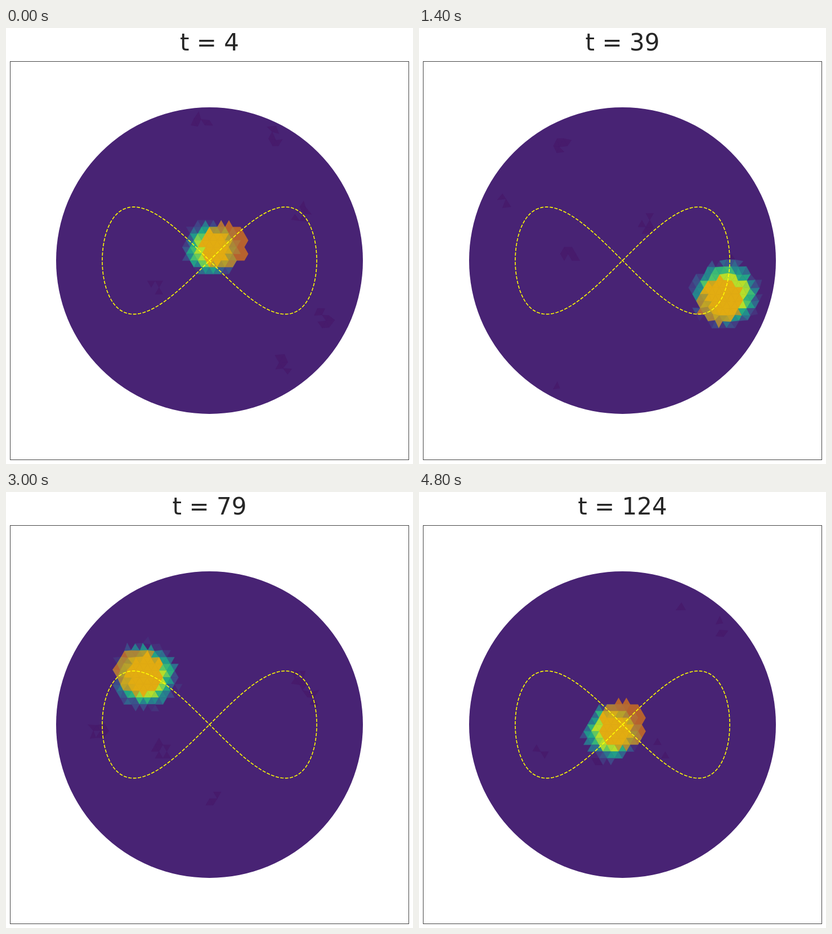
Animation, 723 px wide and 775 px high, one loop 5 s. Source, as an HTML page with a canvas:

```html
<!DOCTYPE html>
<html lang="en">
<head>
<meta charset="utf-8">
<title>Moving inclusion</title>
<style>
html, body { margin: 0; width: 100%; height: 100%; overflow: hidden; background: #fff; }
canvas { position: absolute; left: 0; top: 0; }
#title {
  position: absolute; left: 0; top: 1px; width: 723px; text-align: center;
  font: 42px/50px "DejaVu Sans", sans-serif; color: #262626; white-space: pre;
}
</style>
</head>
<body>
<canvas id="stage" width="723" height="775"></canvas>
<div id="title"></div>
<script>
const ctx = document.getElementById('stage').getContext('2d');
const title = document.getElementById('title');
const CX = 361.5, CY = 413.4, DISC = 272.5, AMP = 190.5;
const SIDE = 13.8, ROW = 11.97, FRAMES = 25;
const TRUE_R = 40.6;

const clamp = v => Math.max(0, Math.min(1, v));
const rand = (a, b) => {
  const s = Math.sin(a * 12.9898 + b * 78.233) * 43758.5453;
  return s - Math.floor(s);
};
const curve = a => [CX + AMP * Math.sin(a), CY - AMP / 2 * Math.sin(2 * a)];

// Viridis colour map
const STOPS = [[68, 1, 84], [72, 36, 117], [65, 68, 135], [53, 95, 141], [42, 120, 142],
  [33, 145, 140], [34, 168, 132], [68, 191, 112], [122, 209, 81], [189, 223, 38], [253, 231, 37]];
function viridis(v) {
  const i = Math.min(9, Math.floor(v * 10)), f = v * 10 - i;
  return `rgb(${STOPS[i].map((c, n) => Math.round(c + (STOPS[i + 1][n] - c) * f))})`;
}

// Triangular mesh, slightly irregular away from the middle
function vertex(k, n) {
  const x = CX + (n + (k % 2 ? 0 : 0.5)) * SIDE, y = CY + k * ROW;
  const j = 4 * clamp((Math.hypot(x - CX, y - CY) - 130) / 60);
  return [x + j * (rand(k, n) - 0.5), y + j * (rand(n, k + 50) - 0.5)];
}
const mesh = [];
function addTriangle(...pts) {
  const x = (pts[0][0] + pts[1][0] + pts[2][0]) / 3;
  const y = (pts[0][1] + pts[1][1] + pts[2][1]) / 3;
  if (Math.hypot(x - CX, y - CY) < DISC + 5) mesh.push({ pts, x, y });
}
for (let k = -24; k < 24; k++) {
  const o = k % 2 ? 0 : 1;
  for (let n = -22; n < 22; n++) {
    addTriangle(vertex(k, n), vertex(k, n + 1), vertex(k + 1, n + o));
    addTriangle(vertex(k, n + 1), vertex(k + 1, n + 1 + o), vertex(k + 1, n + o));
  }
}

// Constant speed along the figure eight: angle for each frame
const angles = [];
{
  const step = 0.0005, total = 6.0972;
  let a = 0, s = 0;
  for (let i = 0; i < FRAMES; i++) {
    const goal = (4 + 5 * i) / 124 * total;
    while (s < goal) {
      s += step * Math.hypot(Math.cos(a), Math.cos(2 * a));
      a += step;
    }
    angles.push(a);
  }
}

// Estimated blob relative to the inclusion: frame, dx, dy, radius
const BLOB = [[0, -23, 5, 46], [5, 0, -30, 55], [9, 22, 7, 58], [11, 5, -33, 39],
  [15, 12, 8, 55], [19, -7, -25, 56], [24, -19, 13, 48]];
function blobAt(i) {
  const n = Math.min(BLOB.length - 2, BLOB.filter(b => b[0] <= i).length - 1);
  const a = BLOB[n], b = BLOB[n + 1], f = (i - a[0]) / (b[0] - a[0]);
  return a.map((v, j) => v + (b[j] - v) * f).slice(1);
}

function trace(t) {
  t.pts.forEach((p, n) => n ? ctx.lineTo(...p) : ctx.moveTo(...p));
  ctx.closePath();
}
function paint(t, color) {
  ctx.beginPath();
  trace(t);
  ctx.fillStyle = ctx.strokeStyle = color;
  ctx.lineWidth = 0.5;
  ctx.fill();
  ctx.stroke();
}

function drawFrame(i) {
  title.textContent = 't = ' + (4 + 5 * i);
  ctx.fillStyle = '#fff';
  ctx.fillRect(0, 0, 723, 775);
  ctx.strokeStyle = '#444';
  ctx.lineWidth = 1;
  ctx.strokeRect(7.5, 59.5, 708, 708);

  ctx.save();
  ctx.beginPath();
  ctx.arc(CX, CY, DISC, 0, 7);
  ctx.fillStyle = '#482374';
  ctx.fill();
  ctx.clip();

  const [tx, ty] = curve(angles[i]), [dx, dy, radius] = blobAt(i);
  const bx = tx + dx, by = ty + dy;
  const specks = [...Array(6).keys()].map(n => {
    const a = 6.283 * rand(i + 1, n), r = 250 * Math.sqrt(rand(n + 9, i));
    return [CX + r * Math.cos(a), CY + r * Math.sin(a)];
  });

  mesh.forEach((t, n) => {
    const d = Math.hypot(t.x - bx, t.y - by) / radius;
    const grain = rand(n, i + 3) - 0.5;
    const level = clamp((1.06 - d) / 0.45 + (d < 1.2 ? grain * 0.4 : 0));
    if (level > 0.03) paint(t, viridis(0.1 + 0.79 * level));
    else if (grain > 0.1 && specks.some(p => Math.hypot(t.x - p[0], t.y - p[1]) < 16)) paint(t, '#471b6c');
  });

  ctx.beginPath();
  mesh.filter(t => Math.hypot(t.x - tx, t.y - ty) < TRUE_R).forEach(trace);
  ctx.fillStyle = 'rgba(255,140,0,.6)';
  ctx.fill();
  ctx.restore();

  ctx.beginPath();
  for (let n = 0; n <= 400; n++) ctx.lineTo(...curve(n * Math.PI / 200));
  ctx.strokeStyle = '#ff0';
  ctx.lineWidth = 1.6;
  ctx.setLineDash([5.92, 2.56]);
  ctx.stroke();
  ctx.setLineDash([]);
}

let shown = -1;
function tick() {
  const i = Math.floor(performance.now() / 200) % FRAMES;
  if (i !== shown) drawFrame(shown = i);
  requestAnimationFrame(tick);
}
tick();
</script>
</body>
</html>
```
